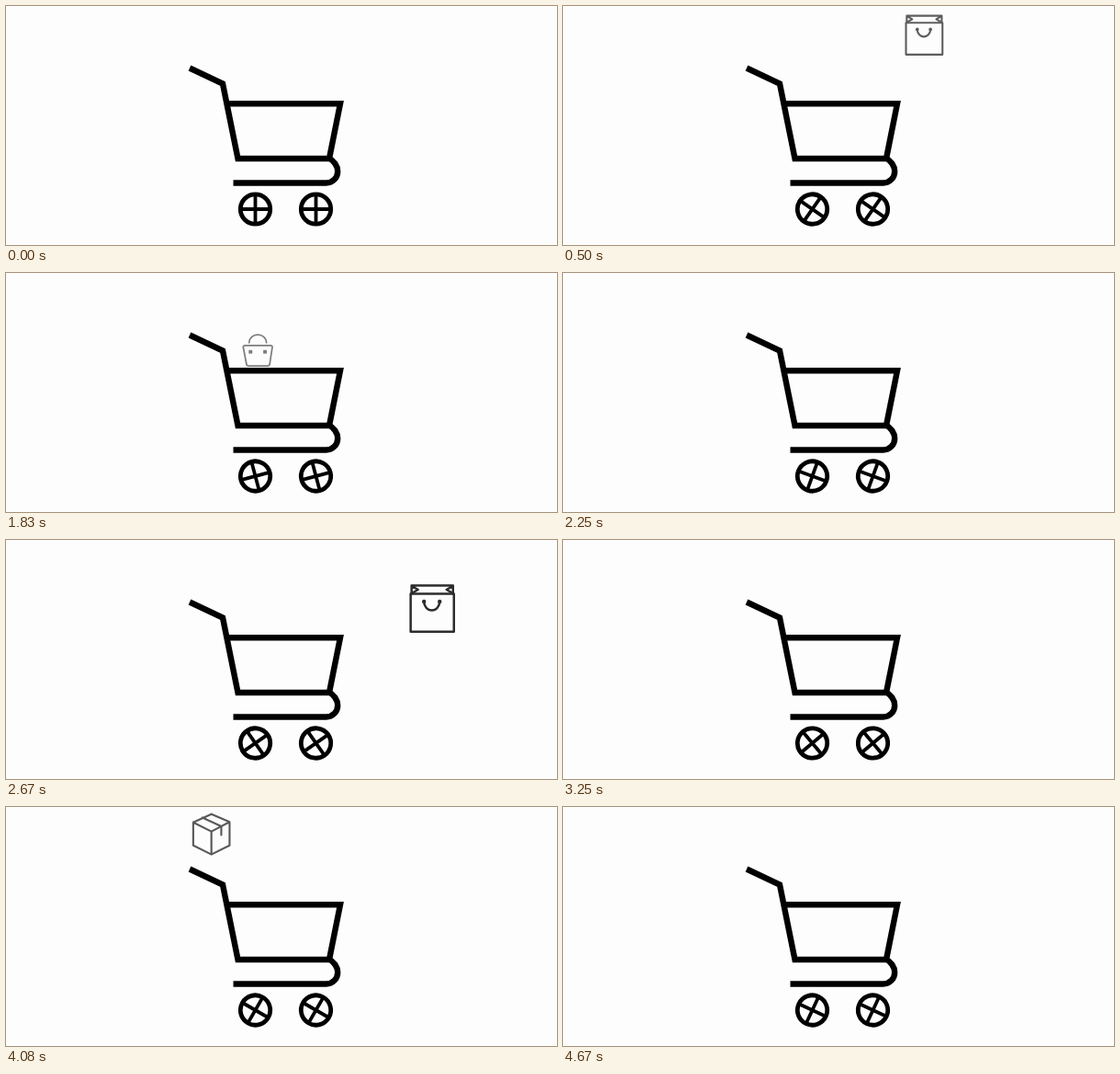
An HTML page for the animation above (4760 ms loop, 600 by 260 pixels).

```html
<!DOCTYPE html>
<html lang="en">
<head>
<meta charset="utf-8">
<title>Shopping cart</title>
<style>
  html, body { margin: 0; width: 100%; height: 100%; overflow: hidden; background: #fdfdfd; }
  svg { display: block; width: 600px; height: 260px; }
  path, rect, circle { fill: none; stroke: #000; stroke-width: inherit; }
  .dot { fill: #000; stroke: none; }
  .cart { stroke-width: 6.4; }
  .item { stroke-width: 2.5; stroke-linejoin: round; stroke-linecap: round; opacity: 0; }
  .rim { stroke-width: 4.8; }
  .spokes { stroke-width: 3.8; }
</style>
</head>
<body>
<svg viewBox="0 0 600 260">
  <defs>
    <g id="bag">
      <rect x="-23" y="-16" width="47" height="41"/>
      <path d="M-22 -16V-25H23V-16M-21 -24L-15 -20.5L-21 -17M22 -24L16 -20.5L22 -17"/>
      <path d="M-8.5 -7.5A8.5 9.5 0 0 0 8.5 -7.5"/>
      <circle class="dot" cx="-8.5" cy="-7.5" r="2.2"/>
      <circle class="dot" cx="8.5" cy="-7.5" r="2.2"/>
    </g>
    <g id="handbag">
      <path d="M-20 -7H20Q23 -7 22.5 -4L18.5 22Q18 24.5 16 24.5H-15Q-17 24.5 -17.5 22L-22.5 -4Q-23 -7 -20 -7Z"/>
      <path d="M-13.5 -11.5A13.5 12.5 0 0 1 13.5 -11.5"/>
      <rect class="dot" x="-14" y="0" width="5.5" height="5.5"/>
      <rect class="dot" x="8.5" y="0" width="5.5" height="5.5"/>
    </g>
    <g id="box">
      <path d="M0 -25.5L23 -15.5V14L0 25.5L-23 14V-15ZM-23 -15L0 -3.5L23 -15.5M0 -3.5V25.5"/>
      <path d="M-11.5 -21L12.5 -10V1"/>
    </g>
    <g id="wheel">
      <circle class="rim" r="16.2"/>
      <path class="spokes" d="M-16 0H16M0 -16V16"/>
    </g>
  </defs>

  <use class="item" href="#bag"/>
  <use class="item" href="#handbag"/>
  <use class="item" href="#bag"/>
  <use class="item" href="#box"/>

  <path class="cart" d="M200 67.5L236 84.5L252.5 166H352L364 106.2H241"/>
  <path class="cart" d="M351 165C357 168 361.2 174 361.2 180A12.5 12.5 0 0 1 348.7 192.5H247.5"/>
  <g transform="translate(271.5 221)"><use class="wheel" href="#wheel"/></g>
  <g transform="translate(337.5 221)"><use class="wheel" href="#wheel"/></g>
</svg>
<script>
  const LOOP = 4760, STEP = 1000 / 12, LAST = 56, TURN = 1200;
  const REACH = 201, FLIGHT = 750, FADE = 100;
  const items = document.querySelectorAll('.item');
  const wheels = document.querySelectorAll('.wheel');

  // Each item is thrown along a parabola, alternately from the right and the left,
  // and shrinks and fades as it nears the cart.
  function placeItem(item, index, t) {
    if (t <= 0 || t >= FLIGHT) {
      item.style.opacity = 0;
      return;
    }
    const side = index % 2 ? -1 : 1;
    const dist = Math.max(0, REACH - 0.246 * t - 0.0000954 * t * t);
    const arc = 28.1 + 0.0152 * (dist - 97.4) ** 2;
    const y = t > FLIGHT / 2 ? Math.min(arc, 112) : arc;
    const scale = 1.04 - 1.12e-6 * t * t;
    const fade = Math.min(1, t / FADE, (FLIGHT - t) / FADE);
    item.setAttribute('transform', `translate(${311 + side * dist} ${y}) scale(${scale})`);
    item.style.opacity = fade * (0.4 + 0.56 * dist / REACH);
  }

  function draw(now) {
    // The motion runs at 12 pictures a second, after one still picture.
    const tick = Math.min(LAST, Math.floor((now % LOOP + 4) / STEP));
    const t = Math.max(0, tick - 1) * STEP;
    items.forEach((item, i) => placeItem(item, i, t - i * TURN));
    wheels.forEach(w => w.setAttribute('transform', `rotate(${t / TURN * 360})`));
  }

  const start = performance.now();
  function loop() {
    draw(performance.now() - start);
    requestAnimationFrame(loop);
  }
  loop();
</script>
</body>
</html>
```
